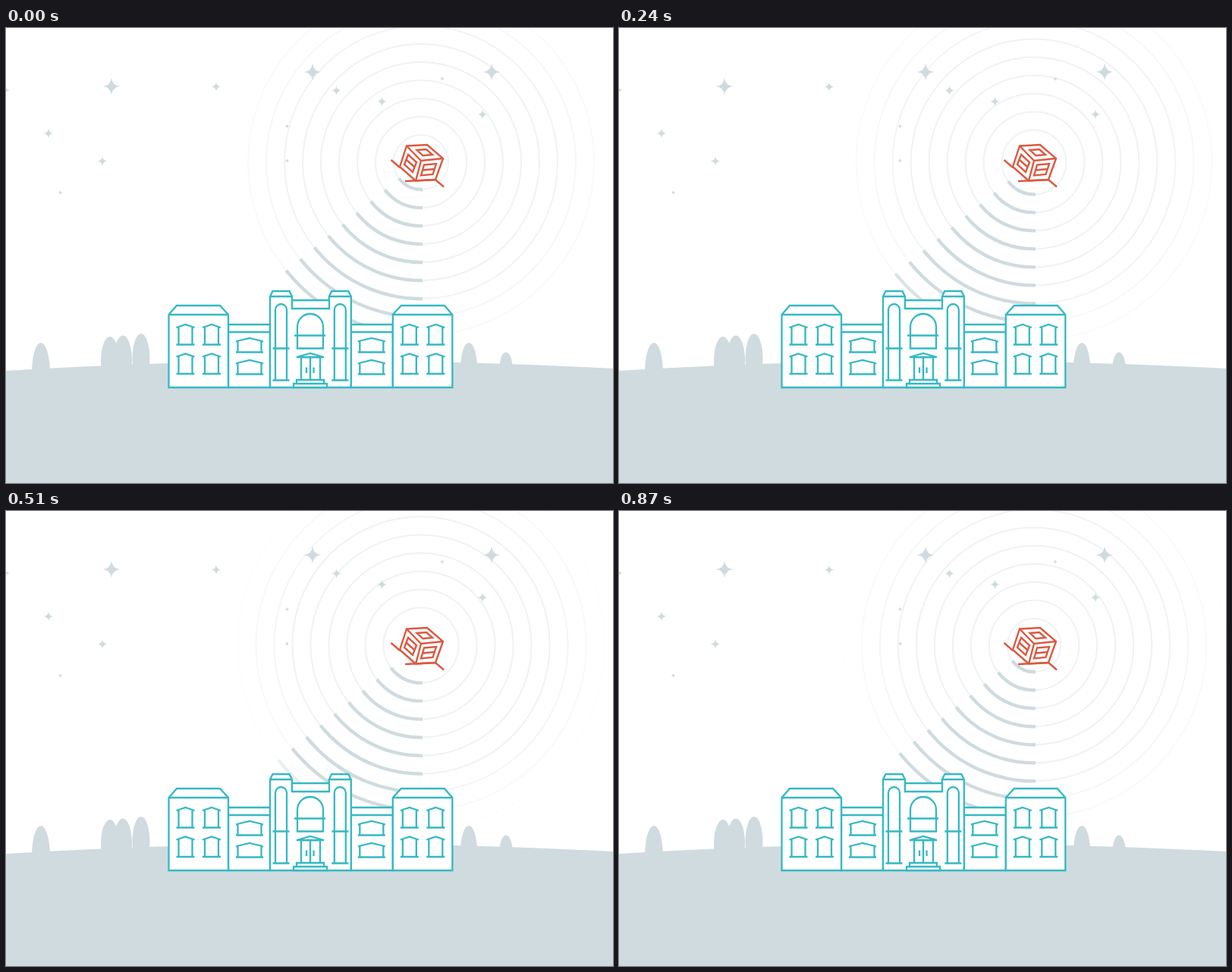
An HTML page for the animation above (900 ms loop, 800x600 px).

```html
<!DOCTYPE html>
<html lang="en">
<head>
<meta charset="utf-8">
<style>
  html, body { margin: 0; width: 100%; height: 100%; overflow: hidden; background: #fff; }
  svg { display: block; width: 800px; height: 600px; }
</style>
</head>
<body>
<svg viewBox="0 0 800 600">
  <defs>
    <clipPath id="beam"><path d="M549 177H543.6L299 377.3V450H549Z"/></clipPath>
    <path id="star" d="M0-1Q.09-.09 1 0Q.09 .09 0 1Q-.09 .09-1 0Q-.09-.09 0-1Z"/>
    <path id="tall" d="M-12 4L-9 3 0 0 9 3 12 4M-9 3V26.5M9 3V26.5M-12 26.5H12"/>
    <path id="wide" d="M-18 4.5L-15 3.5 0 0 15 3.5 18 4.5M-15.5 3.5V18.5M15.5 3.5V18.5M-18 18.5H18"/>
    <g id="half">
      <path d="M293 391H348V474H293ZM293 401H348"/>
      <path d="M214.5 378L225 366H282L293 378V474H214.5ZM214.5 378H293"/>
      <use href="#tall" x="236.5" y="391"/><use href="#tall" x="271" y="391"/>
      <use href="#tall" x="236.5" y="429.5"/><use href="#tall" x="271" y="429.5"/>
      <use href="#wide" x="321" y="409"/><use href="#wide" x="321" y="438"/>
      <path d="M348 474V354L351.5 347H373.5L377 354V370M348 354H377"/>
      <path d="M355 464.5V371.5A7.5 7.5 0 0 1 370 371.5V464.5M351.5 422.5H373.5M351.5 464.5H373.5"/>
    </g>
  </defs>

  <g id="rings" fill="none" stroke="#f0f2f3" stroke-width="2"></g>
  <g id="arcs" fill="none" stroke="#d0dbdf" stroke-width="4.4" clip-path="url(#beam)"></g>
  <g id="stars" fill="#d0dbdf"></g>

  <g fill="#d0dbdf">
    <ellipse cx="46" cy="455" rx="12" ry="40"/>
    <ellipse cx="137" cy="439" rx="12" ry="32"/>
    <ellipse cx="154" cy="438" rx="12" ry="32.5"/>
    <ellipse cx="178" cy="436" rx="11.5" ry="33"/>
    <ellipse cx="610" cy="449" rx="11" ry="34"/>
    <ellipse cx="659" cy="452" rx="9" ry="24.5"/>
    <path d="M0 452Q400 427.6 800 449V600H0Z"/>
  </g>

  <g fill="#fff" stroke="#34b9c3" stroke-width="2.3">
    <path d="M348 474V354L377 359H426L455 354V474Z" stroke="none"/>
    <use href="#half"/>
    <use href="#half" transform="matrix(-1 0 0 1 802.8 0)"/>
    <path d="M377 359H426V370H377ZM348 474H455"/>
    <path d="M384 422.5V394A17 17 0 0 1 418 394V422.5ZM380 405.5H421"/>
    <path d="M389 464V434H414V464M401 434V464M396 447.5V455M405.5 447.5V455"/>
    <path d="M383 434L401 429 419 434ZM383 464H419V469H383ZM379 469H423V474H379Z"/>
  </g>

  <g fill="#fff" stroke="#d95a42" stroke-width="2.4">
    <path d="M528 155.5L555 154 576 172 566 200 540 201.5 519 183Z"/>
    <path d="M528 155.5L547 175 576 172M547 175L540 201.5" fill="none"/>
    <path d="M507.5 174L519 184M526 202L566 200 577 209.5" fill="none"/>
    <path d="M541.5 161L554 160 562 167 549.5 168.3Z"/>
    <path d="M530 167L541 177 536 190 525 180ZM527.5 173.5L538.5 183.5"/>
    <path d="M551 180.5L567 179 562.5 193 547 194.5ZM549 187.5L564.5 186"/>
  </g>
</svg>
<script>
const PERIOD = 900, STEP = 30, GAP = 24, COUNT = 10;
const byId = id => document.getElementById(id);
const clamp = v => Math.max(0, Math.min(1, v));

function add(parent, tag, attrs) {
  const el = document.createElementNS("http://www.w3.org/2000/svg", tag);
  for (const key in attrs) el.setAttribute(key, attrs[key]);
  return parent.appendChild(el);
}

const starSizes = {
  11.5: [[139, 77], [404, 58], [640, 58]],
  6.5: [[-1.5, 82], [277, 77.5], [56, 139], [127, 175.5], [435.5, 82.5], [495.5, 97], [628, 114]],
  3.3: [[71.5, 217], [575, 67], [370.5, 129.5], [370.5, 175]]
};
for (const size in starSizes)
  for (const [x, y] of starSizes[size])
    add(byId("stars"), "use", { href: "#star", transform: `translate(${x} ${y}) scale(${size})` });

const waves = Array.from({ length: COUNT }, () =>
  ["rings", "arcs"].map(id => add(byId(id), "circle", { cx: 547, cy: 177 })));

function draw(now) {
  const time = Math.floor(now % PERIOD / STEP) * STEP;
  waves.forEach(([ring, arc], i) => {
    const r = 12 + GAP * (i + time / PERIOD);
    const fadeIn = clamp((r - 22) / 10);
    ring.setAttribute("r", r);
    arc.setAttribute("r", r);
    ring.setAttribute("opacity", fadeIn * clamp((260 - r) / 90));
    arc.setAttribute("opacity", fadeIn * clamp((250 - r) / 20));
  });
}

const start = performance.now();
function loop() {
  draw(performance.now() - start);
  requestAnimationFrame(loop);
}
loop();
</script>
</body>
</html>
```
